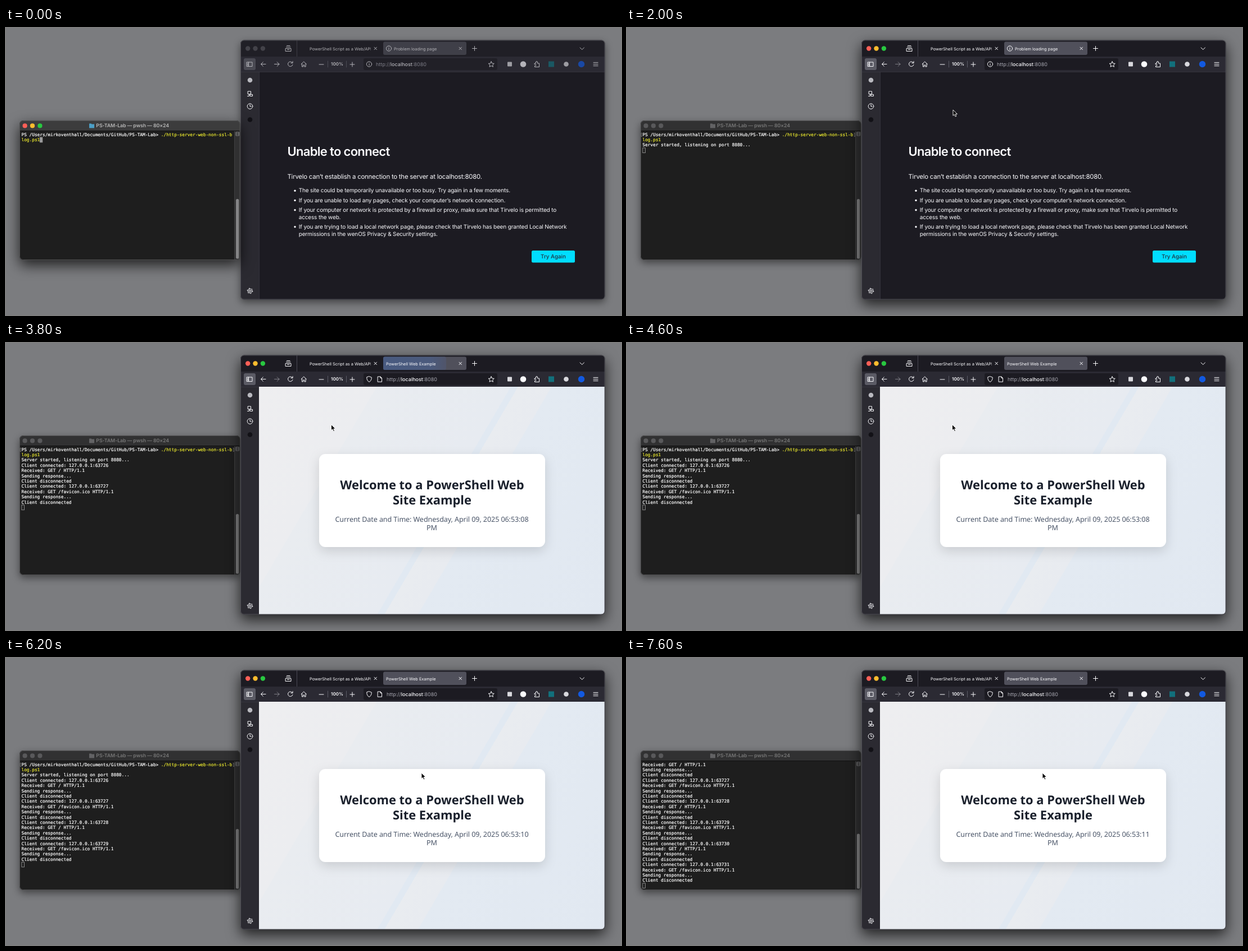
Write an HTML page that moves like this. It is 1094 by 512 pixels and loops after 8000 ms.

```html
<!DOCTYPE html>
<html lang="en">
<head>
<meta charset="utf-8">
<title>Local web server</title>
<style>
html, body { margin: 0; width: 100%; height: 100%; overflow: hidden; background: #7b7c7f; }
svg { display: block; }
text { font-family: Inter, sans-serif; fill: #fbfbfe; text-rendering: geometricPrecision; white-space: pre; }
.icon { fill: none; stroke: #fbfbfe; stroke-width: 1; stroke-linecap: round; stroke-linejoin: round; }
.small { font-size: 7.4px; }
.url { font-size: 9px; fill: #a9a9b2; }
.url tspan { fill: #fbfbfe; font-weight: 500; }
.list { font-size: 10px; letter-spacing: -.015em; }
.page { font-family: "Noto Sans", "Open Sans", sans-serif; text-anchor: middle; }
.h { font-size: 21.9px; font-weight: 700; fill: #1a202c; }
.p { font-size: 12.6px; letter-spacing: -.008em; fill: #4a5568; }
#lines text { font: 7.79px "DejaVu Sans Mono", monospace; stroke: #fff; stroke-width: .22; fill: #fff; }
#lines .cmd { fill: #e8e62e; stroke: #e8e62e; }
#lines .mark { fill: #999; stroke: none; }
#title { font-size: 8.8px; font-weight: 600; letter-spacing: -.01em; fill: #777; }
#termBar { fill: #313132; }
#folder { fill: #636365; }
#termLights circle { fill: #59595b; }
#caret { fill: none; stroke: #a5a5a5; stroke-width: .8; }
#termFrame { filter: drop-shadow(0 5px 7px #0007); }
#webFrame { filter: drop-shadow(0 9px 12px #000b); }
#forward { opacity: .4; }
.term #title { fill: #b9b9b9; }
.term #termBar { fill: #3c3c3d; }
.term #folder { fill: #4c9fc6; }
.term #caret { fill: #9b9b9b; }
.term #termFrame { filter: drop-shadow(0 9px 12px #000b); }
.term #webFrame { filter: drop-shadow(0 5px 7px #0007); }
.term #chrome { opacity: .66; }
.term #forward { opacity: 1; }
.term #webLights circle { fill: #55555c; }
.term #tabBar { fill: #201f26; }
</style>
</head>
<body>
<svg id="stage" width="1094" height="512" viewBox="0 0 1094 512">
  <defs>
    <clipPath id="webClip"><rect x="417.5" y="22" width="647.5" height="462" rx="6"/></clipPath>
    <clipPath id="termClip"><rect x="24.5" y="165.5" width="391.5" height="248" rx="6"/></clipPath>
    <clipPath id="tabClip"><rect x="530" y="24" width="119" height="24"/></clipPath>
    <linearGradient id="sky" gradientUnits="userSpaceOnUse" x1="450" y1="78" x2="1084.6" y2="449.3">
      <stop offset="0" stop-color="#eeeef0"/><stop offset=".246" stop-color="#ecedf0"/>
      <stop offset=".246" stop-color="#e9ecf0"/><stop offset=".526" stop-color="#e7ebf1"/>
      <stop offset=".526" stop-color="#e1e9f2"/><stop offset=".541" stop-color="#e1e9f2"/>
      <stop offset=".541" stop-color="#e9ecf0"/><stop offset=".611" stop-color="#e8ebf0"/>
      <stop offset=".611" stop-color="#e3eaf2"/><stop offset="1" stop-color="#e1e8f1"/>
    </linearGradient>
    <linearGradient id="flashFill">
      <stop offset="0" stop-color="#485a80"/><stop offset=".75" stop-color="#4b5a7c"/><stop offset="1" stop-color="#50556a"/>
    </linearGradient>
  </defs>

  <g id="web">
    <rect id="webFrame" x="417" y="21.5" width="648.5" height="463" rx="6.5" fill="#1c1b22"/>
    <g clip-path="url(#webClip)">
      <rect id="tabBar" x="417" y="22" width="649" height="29" fill="#1c1b22"/>
      <rect x="417" y="51" width="649" height="27.5" fill="#2b2a33"/>
      <rect x="417" y="78" width="33" height="407" fill="#2b2a31"/>
      <rect x="450" y="78" width="616" height="407" fill="#1c1b22"/>
      <path d="M417 78.5H1066M450.5 78V485" stroke="#3a3942" stroke-width=".8"/>

      <g id="chrome">
        <g id="webLights">
          <circle cx="430.2" cy="36.5" r="4.2" fill="#ff5f57"/>
          <circle cx="443.5" cy="36.5" r="4.2" fill="#febc2e"/>
          <circle cx="456.9" cy="36.5" r="4.2" fill="#28c840"/>
        </g>
        <path d="M517.5 22V51" stroke="#4c4b55"/>
        <rect x="671" y="24.5" width="148" height="23.5" rx="3" fill="#50505b"/>
        <rect id="flash" x="671" y="24.5" width="112" height="23.5" rx="3" fill="url(#flashFill)"/>
        <rect x="423" y="54" width="21" height="21" rx="3" fill="#5b5b65"/>
        <rect x="636" y="54" width="238" height="21" rx="3" fill="#1c1b22"/>
        <g class="icon">
          <path d="M497.5 36.5h9.5v5h-9.5zM498.500 34h7.500M499.500 31.500h5.500M500.500 38.500h3.500"/>
          <path d="M655 34.200l4.500 4.500m0-4.500l-4.500 4.500M806 34.200l4.500 4.500m0-4.500l-4.500 4.500M829.500 36.500h8m-4-4v8M1021 35l3.700 3.500l3.700-3.500"/>
          <path d="M428.500 61h9.500v7.500h-9.500zM431.500 61v7.500M430 63v4"/>
          <path d="M462 64.500h-8.500m3.800-3.800l-3.800 3.800l3.800 3.800"/>
          <path id="forward" d="M477.500 64.500h8.500m-3.800-3.800l3.800 3.800l-3.800 3.800"/>
          <path id="reload" d="M509.500 62a4.300 4.300 0 1 0 .5 3.500M510 59.500v3h-3"/>
          <path d="M525 64.500l4.700-4.500l4.700 4.500M526.500 63.500v5.500h2.200v-3h2.200v3h2.200v-5.500"/>
          <path d="M557 65h8M612 65h8m-4-4v8"/>
          <path d="M572.500 59v11M605.500 59v11" stroke="#5b5b66"/>
          <path d="M863.200 59.800l1.500 3.200l3.600 .4l-2.700 2.400l.8 3.500l-3.200-1.800l-3.200 1.800l.8-3.500l-2.700-2.400l3.600-.4z"/>
          <path d="M940.500 63h2v-2a1.500 1.500 0 0 1 3 0v2h3v6.500h-8v-2h1a1.300 1.300 0 0 0 0-2.600h-1z"/>
          <path d="M1045 61.500h8m-8 3h8m-8 3h8"/>
        </g>
        <rect x="892" y="60.500" width="8" height="8" rx="1" fill="#d9d9de"/>
        <circle cx="920" cy="64.500" r="5.300" fill="#fbfbfe"/>
        <rect x="965" y="59.500" width="10" height="10" fill="#12707c"/>
        <circle cx="996.500" cy="64.500" r="4.300" fill="#d9d9de"/>
        <circle cx="1023.500" cy="64.500" r="5.700" fill="#1259e0"/>
        <g clip-path="url(#tabClip)"><text class="small" x="540" y="39.500">PowerShell Script as a Web/API</text></g>
        <text id="tabText" class="small" x="690" y="39.500"></text>
        <rect id="spinner" y="35.700" height="1.700" rx=".8" fill="#d4d4dc"/>
        <text x="578" y="67.400" font-size="8" font-weight="600">100%</text>
        <g id="tabInfo" class="icon"><circle cx="681" cy="36.500" r="4.600"/><path d="M681 36v2.700M681 34.100v.1"/></g>
        <g id="urlInfo" class="icon"><circle cx="646" cy="64.500" r="4.600"/><path d="M646 64v2.700M646 62.100v.1"/></g>
        <path id="urlSite" class="icon" d="M646 59.700l4.300 1.600q0 6-4.300 8.200q-4.300-2.200-4.300-8.200zM661.500 60h4.500l2.500 2.500v6.800h-7zM666 60v2.500h2.500"/>
        <text id="url" class="url" y="68">http://<tspan>localhost</tspan>:8080</text>
      </g>

      <circle cx="434" cy="93" r="4.300" fill="#b9b9bf"/>
      <circle cx="434" cy="163.500" r="4.300" fill="#121116"/>
      <g class="icon">
        <path d="M430.500 113h5v5h-5zM429.500 121.500h3v-3.500M434.500 118.500h4v3h-4z"/>
        <circle cx="434" cy="139.700" r="4.800"/><path d="M434 136.700v3.200h2.500"/>
        <circle cx="434" cy="469" r="1.500"/><circle cx="434" cy="469" r="3.700"/>
        <circle cx="434" cy="469" r="4.900" stroke-dasharray="1.700 3.430" stroke-linecap="butt"/>
      </g>

      <g id="errorPage">
        <text x="500.500" y="228" font-size="22" font-weight="600" letter-spacing="-.68">Unable to connect</text>
        <text x="500.500" y="268.500" font-size="11.400" letter-spacing="-.228">Tirvelo can’t establish a connection to the server at localhost:8080.</text>
        <g id="tips"></g>
        <rect x="935" y="397" width="77" height="21.500" rx="2.500" fill="#00ddff"/>
        <text x="973.500" y="411.300" font-size="9.800" font-weight="500" text-anchor="middle" style="fill:#20333f">Try Again</text>
      </g>

      <g id="sitePage">
        <rect x="450" y="78" width="616" height="407" fill="url(#sky)"/>
        <rect x="557" y="198" width="402" height="166" rx="11" fill="#fff" style="filter:drop-shadow(0 7px 10px #0002)"/>
        <text class="page h" x="758" y="261">Welcome to a PowerShell Web</text>
        <text class="page h" x="758" y="287.500">Site Example</text>
        <text id="date" class="page p" x="757.500" y="318.500"></text>
        <text class="page p" x="757.500" y="334.300">PM</text>
      </g>

      <g id="status">
        <path d="M449 471.500h161.500q2 0 2 2V485H449z" fill="#2b2a33" stroke="#62616b" stroke-width=".8"/>
        <text x="453" y="480.700" font-size="7.500">localhost</text>
      </g>
    </g>
    <rect x="417.500" y="22" width="647.500" height="462" rx="6" fill="none" stroke="#58575e" stroke-width=".9"/>
  </g>

  <g id="term">
    <rect id="termFrame" x="24" y="165" width="392.500" height="249" rx="6.500" fill="#1e1e1e"/>
    <g clip-path="url(#termClip)">
      <rect id="termBar" x="24" y="165" width="393" height="18.500"/>
      <path d="M24 183.500H417" stroke="#0c0c0c" stroke-width=".8"/>
      <rect x="406.500" y="184" width="10" height="230" fill="#303031"/>
      <path d="M406.500 184V414" stroke="#484848" stroke-width=".8"/>
      <path d="M409 186h5.500v6h-5.500zM409 189h5.500" fill="none" stroke="#99999a" stroke-width=".8"/>
      <rect id="thumb" x="409" width="5.300" rx="2.600" fill="#858586"/>
      <g id="termLights"></g>
      <path id="folder" d="M148 170.500h3.500l1 1h4.500v7h-9z"/>
      <text id="title" x="160.300" y="177.300">PS-TAM-Lab — pwsh — 80×24</text>
      <g id="lines"></g>
      <rect id="caret" width="4.500" height="8.800"/>
    </g>
    <rect x="24.500" y="165.500" width="391.500" height="248" rx="6" fill="none" stroke="#555556" stroke-width=".9"/>
  </g>

  <path id="pointer" d="M0 0v10.300l2.400-2.100l1.700 3.800l1.800-.8l-1.700-3.700h3.200z" fill="#000" stroke="#fff" stroke-width=".9"/>
</svg>
<script>
const $ = id => document.getElementById(id);
const show = (id, on) => { $(id).style.display = on ? '' : 'none'; };
const LOOP = 8000, STEP = 200, ROW = 9.39, ROWS = 24, COL = 4.69;
const FOCUS = 1600, LOADS = [3600, 5800, 7200], SECONDS = ['08', '10', '11'];

// time, x, y of the pointer tip
const PATH = [[1200, 430, 190], [1600, 580, 146], [2200, 580, 146], [2600, 578.5, 145.5],
  [4600, 578.5, 145.5], [5400, 738, 206], [5600, 738, 206], [6000, 739, 205]];

const TIPS = [
  [293.4, 'The site could be temporarily unavailable or too busy. Try again in a few moments.', 1],
  [310.7, 'If you are unable to load any pages, check your computer’s network connection.', 1],
  [328, 'If your computer or network is protected by a firewall or proxy, make sure that Tirvelo is permitted to', 1],
  [340.6, 'access the web.'],
  [358, 'If you are trying to load a local network page, please check that Tirvelo has been granted Local Network', 1],
  [370.5, 'permissions in the wenOS Privacy & Security settings.']];
$('tips').innerHTML = TIPS.map(([y, text, dot]) =>
  `<text class="list" x="520.7" y="${y}">${text.replace('&', '&amp;')}</text>` +
  (dot ? `<circle cx="514" cy="${y - 3.2}" r="1.7" fill="#fbfbfe"/>` : '')).join('');

const PROMPT = 'PS /Users/mirkoventhall/Documents/GitHub/PS-TAM-Lab&gt; <tspan class="cmd">./http-server-web-non-ssl-b</tspan>';

function logLines(started, clients) {
  const lines = [PROMPT, '<tspan class="cmd">log.ps1</tspan>'];
  if (started) lines.push('Server started, listening on port 8080...');
  for (let i = 0; i < clients; i++)
    lines.push('Client connected: 127.0.0.1:' + (63726 + i),
      `Received: GET /${i % 2 ? 'favicon.ico' : ''} HTTP/1.1`, 'Sending response...', 'Client disconnected');
  return lines;
}

function drawTerminal(t, loaded) {
  const started = t >= 600, all = logLines(started, loaded * 2);
  const rows = started ? all.length + 1 : all.length;
  const skip = Math.max(0, rows - ROWS);
  const y = i => 192.7 + i * ROW;
  $('lines').innerHTML = all.slice(skip).map((s, i) => `<text x="27.5" y="${y(i)}">${s}</text>`).join('') +
    (started && !skip ? `<text class="mark" x="23.5" y="${y(0)}">[</text><text class="mark" x="402.6" y="${y(0)}">]</text>` : '');
  $('caret').setAttribute('x', started ? 27.9 : 27.5 + 7 * COL);
  $('caret').setAttribute('y', y(rows - 1 - skip) - 7);
  const top = skip ? 313.5 : 305;
  $('thumb').setAttribute('y', top);
  $('thumb').setAttribute('height', 411.5 - top);
  const lights = t < FOCUS ? ['#ff5f57', '#febc2e', '#28c840'] : Array(3).fill('#59595b');
  $('termLights').innerHTML = lights.map((c, i) => `<circle cx="${33.6 + i * 13.4}" cy="174.4" r="4.1" style="fill:${c}"/>`).join('');
}

function drawBrowser(t, loaded) {
  const loading = LOADS.includes(t);
  show('flash', LOADS.includes(t - STEP));
  show('status', loading);
  show('spinner', loading);
  show('errorPage', !loaded);
  show('sitePage', loaded);
  show('tabInfo', t < LOADS[0]);
  show('urlInfo', t < LOADS[0]);
  show('urlSite', t >= LOADS[0]);
  $('url').setAttribute('x', t < LOADS[0] ? 658 : 677);
  $('tabText').setAttribute('x', loaded && !loading ? 676 : 690);
  $('tabText').textContent = loaded ? 'PowerShell Web Example' : 'Problem loading page';
  $('spinner').setAttribute('x', loaded ? 676.5 : 684);
  $('spinner').setAttribute('width', loaded ? 3.5 : 1.7);
  $('reload').setAttribute('transform', loading ? 'rotate(110 506 64.5)' : '');
  $('date').textContent = 'Current Date and Time: Wednesday, April 09, 2025 06:53:' + SECONDS[Math.max(0, loaded - 1)];
}

function drawPointer(t) {
  show('pointer', t >= PATH[0][0]);
  const next = PATH.findIndex(k => k[0] > t);
  const b = PATH[next < 0 ? PATH.length - 1 : next], a = next > 0 ? PATH[next - 1] : b;
  const u = a === b ? 0 : (t - a[0]) / (b[0] - a[0]), e = u * u * (3 - 2 * u);
  $('pointer').setAttribute('transform', `translate(${a[1] + (b[1] - a[1]) * e} ${a[2] + (b[2] - a[2]) * e})`);
}

let last = -1;
function frame(now) {
  const t = Math.floor(now % LOOP / STEP) * STEP;
  if (t !== last) {
    last = t;
    const inTerm = t < FOCUS, loaded = LOADS.filter(s => t > s).length;
    $('stage').classList.toggle('term', inTerm);
    $('stage').append(...(inTerm ? ['web', 'term'] : ['term', 'web']).map($), $('pointer'));
    drawTerminal(t, loaded);
    drawBrowser(t, loaded);
    drawPointer(t);
  }
  requestAnimationFrame(frame);
}
const start = performance.now();
const tick = () => { frame(Math.max(0, performance.now() - start)); };
tick();
</script>
</body>
</html>
```
